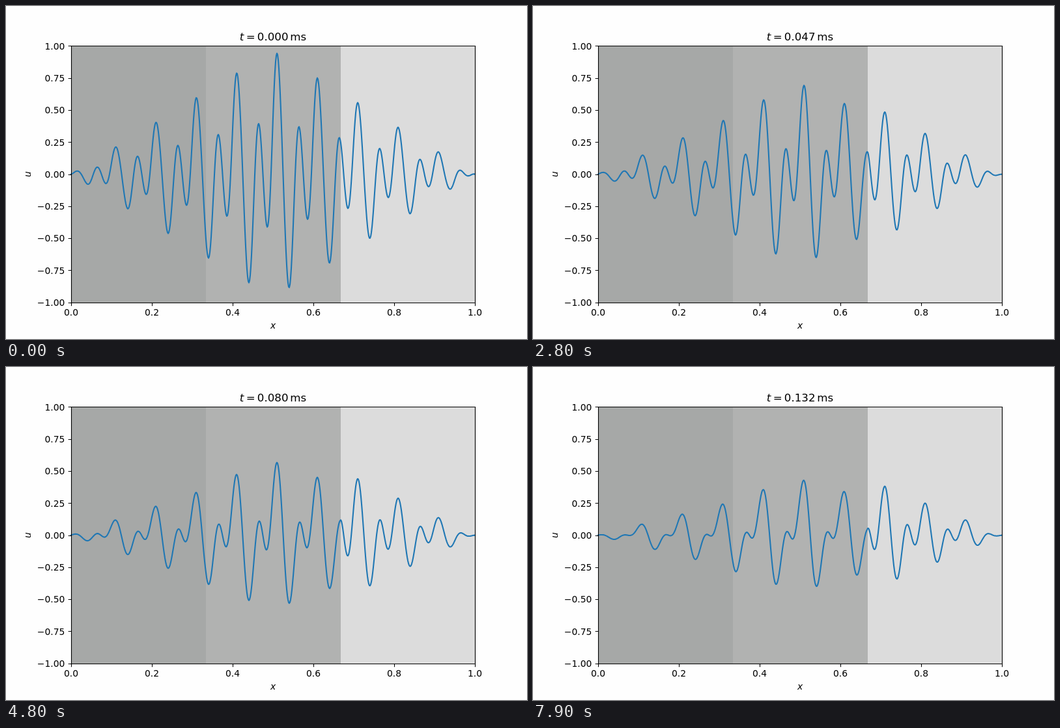
An HTML page that plays this animation: 800x512 px, repeating every 8000 ms.

```html
<!DOCTYPE html>
<html lang="en">
<head>
<meta charset="utf-8">
<title>Heat diffusion in a layered rod</title>
<style>
  html, body { margin: 0; width: 100%; height: 100%; overflow: hidden; background: #fefefe; }
  svg { display: block; width: 800px; height: 512px; }
  text { font: 13.89px "DejaVu Sans", sans-serif; fill: #000; white-space: pre; }
  .title text { font-size: 16.67px; }
  text.var { font-style: italic; }
  .axes { fill: none; stroke: #000; stroke-width: 1.11; }
  #wave { fill: none; stroke: #1f77b4; stroke-width: 2.083; stroke-linejoin: round; stroke-linecap: square; }
</style>
</head>
<body>
<svg viewBox="0 0 800 512">
  <rect x="100" y="61" width="207" height="395" fill="#a6a8a7"/>
  <rect x="307" y="61" width="207" height="395" fill="#b1b2b1"/>
  <rect x="514" y="61" width="206" height="395" fill="#dcdcdc"/>
  <path id="wave"/>
  <path class="axes" id="axes"/>
  <g id="labels"></g>
  <g class="title">
    <text class="var" x="358.85" y="53">t</text>
    <text x="368.63" y="53">=</text>
    <text id="clock" x="385.85" y="53">0.000</text>
    <text x="436.25" y="53">ms</text>
  </g>
  <text class="var" x="410" y="496" text-anchor="middle">x</text>
  <text class="var" transform="translate(38 258.6) rotate(-90)" text-anchor="middle">u</text>
</svg>
<script>
const FRAMES = 80, STEP_MS = 100, SUBSTEPS = 4, CELLS = 620;
const LEFT = 100, WIDTH = 620, MID = 258.56, UNIT = 197.12;
const $ = id => document.getElementById(id);

// Decay of the base harmonic over the whole run, per layer.
const LAYERS = [0.347, 0.3, 0.133];
const BASE = 20 * Math.PI;

function buildAxes() {
  const snap = v => Math.floor(v + 0.5) + 0.5;
  let path = "M100.5 61.5H720.5V456.5H100.5Z";
  let labels = "";
  for (let i = 0; i <= 5; i++) {
    const x = LEFT + i * WIDTH / 5;
    path += `M${snap(x)} 456.5v4.86`;
    labels += `<text x="${x}" y="476" text-anchor="middle">${(i / 5).toFixed(1)}</text>`;
  }
  for (let i = -4; i <= 4; i++) {
    const y = MID - i / 4 * UNIT;
    const sign = i < 0 ? "\u2212" : "";
    path += `M100.5 ${snap(y)}h-4.86`;
    labels += `<text x="90.3" y="${Math.round(y + 5.3)}" text-anchor="end">${sign}${Math.abs(i / 4).toFixed(2)}</text>`;
  }
  $("axes").setAttribute("d", path);
  $("labels").innerHTML = labels;
}

// Triangular envelope over a few harmonics.
function initial(x) {
  const a = BASE * x;
  const carrier = 0.404 * Math.cos(a) + 0.668 * Math.sin(2 * a)
    + 0.038 * Math.cos(3 * a) + 0.02 * Math.sin(4 * a);
  return (1 - Math.abs(2 * x - 1)) * carrier;
}

function toPath(u) {
  return "M" + u.map((v, i) =>
    (LEFT + i * WIDTH / CELLS) + " " + (MID - v * UNIT).toFixed(2)).join("L");
}

// Explicit heat equation with fixed zero ends.
function solve() {
  const scale = (CELLS / BASE) ** 2 / ((FRAMES - 1) * SUBSTEPS);
  const rate = Array.from({ length: CELLS }, (_, i) =>
    scale * LAYERS[Math.floor(3 * (i + 0.5) / CELLS)]);
  let u = Array.from({ length: CELLS + 1 }, (_, i) => initial(i / CELLS));
  u[0] = u[CELLS] = 0;
  const paths = [toPath(u)];
  while (paths.length < FRAMES) {
    for (let s = 0; s < SUBSTEPS; s++) {
      u = u.map((v, i) => i === 0 || i === CELLS ? 0 :
        v + rate[i] * (u[i + 1] - v) - rate[i - 1] * (v - u[i - 1]));
    }
    paths.push(toPath(u));
  }
  return paths;
}

buildAxes();
const paths = solve();
let shown = -1;

function show(n) {
  if (n === shown) return;
  shown = n;
  $("wave").setAttribute("d", paths[n]);
  $("clock").textContent = (n / 600).toFixed(3);
}

function tick() {
  show(Math.floor(performance.now() / STEP_MS) % FRAMES);
  requestAnimationFrame(tick);
}

show(0);
requestAnimationFrame(tick);
</script>
</body>
</html>
```
